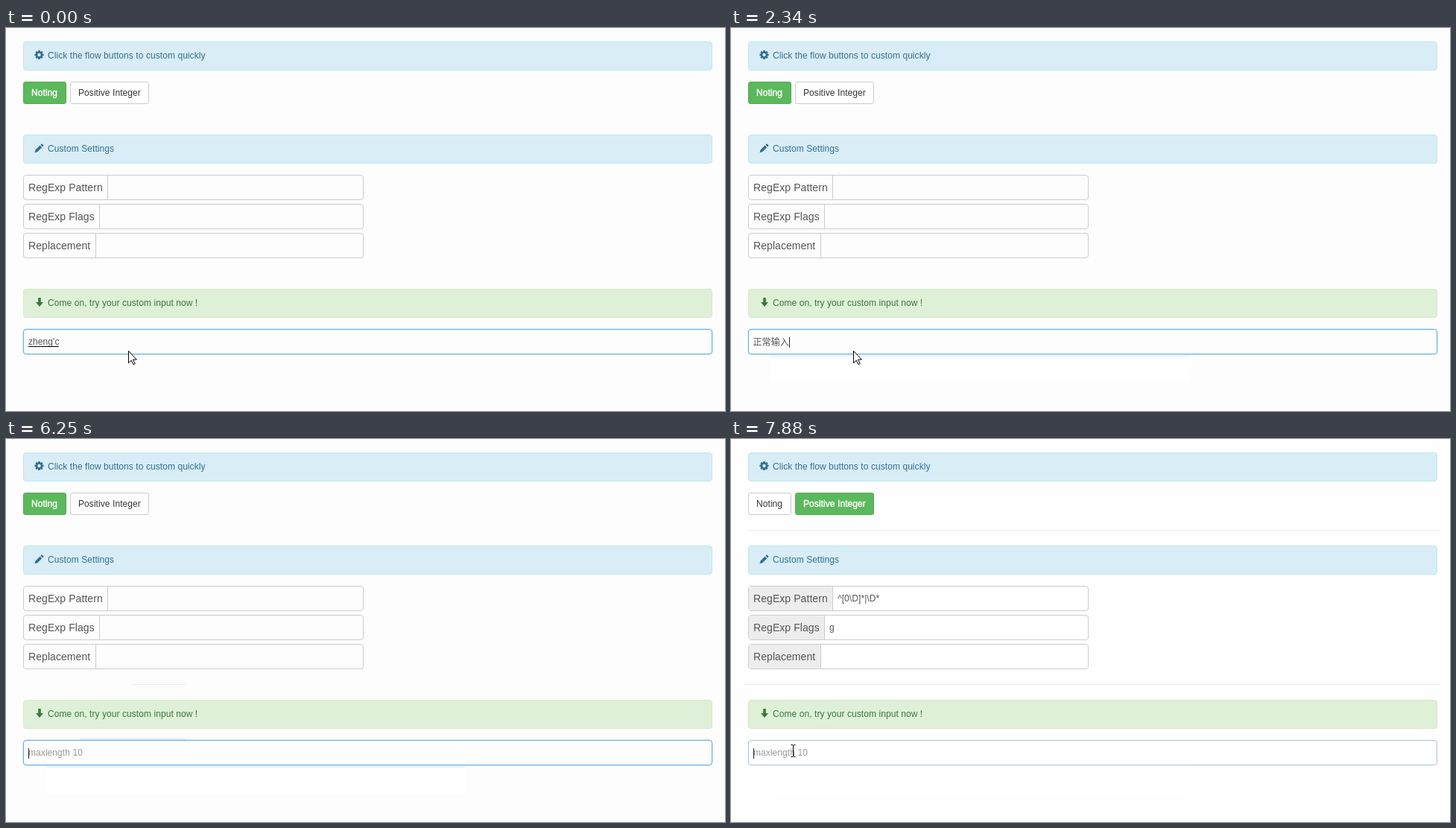
Recreate the animation shown at these times as an HTML page. Size 965 px wide and 514 px high, loop 8000 ms.

```html
<!DOCTYPE html>
<html lang="en">
<head>
<meta charset="utf-8">
<title>Custom input demo</title>
<style>
html, body { margin: 0; width: 100%; height: 100%; overflow: hidden; background: #fdfdfd; }
svg { display: block; width: 965px; height: 514px; }
text { font: 12px "Liberation Sans", "Noto Sans CJK SC", "Noto Sans CJK", sans-serif; letter-spacing: .07px; white-space: pre; }
text.lg { font-size: 14px; }
text.num { font-size: 13px; }
text.han { font: 18px "Noto Sans CJK SC", "Noto Sans CJK", sans-serif; letter-spacing: 0; }
</style>
</head>
<body>
<svg id="stage" viewBox="0 0 965 514"></svg>
<script>
const stage = document.getElementById('stage');
const LOOP = 8000;

const attrs = o => Object.entries(o).map(([k, v]) => ` ${k}="${v}"`).join('');
const esc = s => s.replace(/&/g, '&amp;').replace(/</g, '&lt;');
const fillBox = (x, y, w, h, fill) => `<rect${attrs({ x, y, width: w, height: h, fill })}/>`;
// One-pixel border drawn inside the box
const box = (x, y, w, h, fill, stroke, rx = 3.5) =>
  `<rect${attrs({ x: x + .5, y: y + .5, width: w - 1, height: h - 1, rx, fill, stroke })}/>`;
const text = (x, y, s, fill, cls = '', more = '') =>
  `<text${attrs({ x, y, fill, class: cls })} ${more}>${esc(s)}</text>`;
const path = (d, more) => `<path d="${d}" ${more}/>`;
const at = (x, y, body) => `<g transform="translate(${x} ${y})">${body}</g>`;

const icons = {
  cog() {
    let teeth = '';
    for (let a = 0; a < 360; a += 45)
      teeth += `<rect x="-1.4" y="-6" width="2.8" height="3" transform="rotate(${a})"/>`;
    return at(44.5, 36, `<g fill="#31708f">${teeth}</g><circle r="3.4" fill="none" stroke="#31708f" stroke-width="2.4"/>`);
  },
  pencil: () => at(38, 155, path('M.5 12.2 1.6 8.6 7.6 2.6 10.2 5.2 4.2 11.2ZM8.4 1.8 9.6.6Q10.2.2 10.8.7L12.1 2Q12.6 2.6 12.1 3.2L11 4.4Z', 'fill="#31708f"')),
  down: () => at(40, 362, path('M3.2 0H6.8V6H10L5 12 0 6H3.2Z', 'fill="#3c763d"'))
};

const cursors = {
  arrow: path('M.5.5V16.6L4.2 13 7 18.6 9.2 17.5 6.5 12H11.4Z', 'fill="#fff" stroke="#000"'),
  hand: path('M5.5 14V2.5A1.8 1.8 0 0 1 9.1 2.5V9Q10.7 8 11.7 9.6 13.3 8.7 14.1 10.3 16.3 9.7 16.5 11.9V16Q16.5 19 15 21V23.5H6.5V22Q4 19 1 14.5 .4 12.7 2 12.3 3.6 12.3 5.5 14ZM9.1 9V13M11.7 10V13M14.1 10.5V13',
    'fill="#fff" stroke="#000" stroke-linejoin="round"'),
  beam: path('M.5.5H3M4 .5H6.5M3.5 1V16M.5 16.5H3M4 16.5H6.5', 'fill="none" stroke="#000"')
};

function alertBar(y, icon, label, good) {
  return box(23, y, 925, 39, good ? '#dff0d8' : '#d9edf7', good ? '#d6e9c6' : '#bce8f1') +
    icons[icon]() + text(56, y + 23, label, good ? '#3c763d' : '#31708f');
}

function button(x, w, label, mode) {
  const [bg, edge, ink] = {
    plain: ['#fff', '#ccc', '#333'],
    hover: ['#e6e6e6', '#adadad', '#333'],
    press: ['#d4d4d4', '#8c8c8c', '#333'],
    green: ['#5cb85c', '#4cae4c', '#fff'],
    focus: ['#449d44', '#255625', '#fff']
  }[mode];
  const ring = mode === 'press' || mode === 'focus'
    ? `<rect${attrs({ x, y: 72, width: w, height: 30, rx: 2.5, fill: 'none', stroke: '#6486c8', 'stroke-width': 1.8 })}/>` : '';
  return box(x, 72, w, 30, bg, edge, 2.5) + ring +
    text(x + 11, 91, label, ink, '', ink === '#fff' ? 'stroke="#fff" stroke-width=".4"' : '');
}

function field(y, split, label, value, crisp, off) {
  const grey = '#ededed', base = crisp ? '#fff' : '#fdfdfd';
  return box(23, y, 457, 34, off && crisp ? grey : base, '#ccc') +
    (crisp ? fillBox(24, y + 1, split - 24, 32, grey) : '') +
    fillBox(split, y + 1, 1, 32, '#ccc') +
    text(30, y + 22, label, '#555', 'lg') + text(split + 7, y + 21, value, '#555');
}

// Candidate window: the first entry is picked, the second lies under the mouse
function candidates({ x, right, words }) {
  const end = right - 45;
  let s = fillBox(x, 432, right - x, 44, '#fff'), cx = x;
  words.split(' ').forEach((word, i) => {
    const w = 42 + 18 * word.length;
    const bg = ['#0099bf', '#a8eeff'][i];
    if (bg) s += fillBox(cx, 433, Math.min(w, end - cx), 42, bg);
    s += text(cx + 16, 461, String(i + 1), ['#fff', '#222'][i] || '#777', 'num') +
      text(cx + 27, 461, word, i ? '#000' : '#fff', 'han');
    cx += w;
  });
  s += fillBox(end, 433, 45, 42, '#fff') + box(end - 22, 435, 22, 37, '#ececec', '#bbb', 0) +
    path(`M${end - 16} 444l10 10-10 10`, 'fill="none" stroke="#666" stroke-width="1.5"') +
    fillBox(end, 433, 1, 42, '#168093') +
    at(right - 22.5, 454.5, '<circle r="7.8" fill="none" stroke="#000" stroke-width="1.2"/><circle cx="-2.8" cy="-2" r="1.2"/><circle cx="2.8" cy="-2" r="1.2"/>' +
      path('M-4.5 2Q0 7 4.5 2', 'fill="none" stroke="#000" stroke-width="1.2"'));
  return s + box(x, 432, right - x, 44, 'none', '#168093', 0);
}

function entry(s) {
  const edge = { on: '#66afe9', off: '#ccc', mid: '#a9c1d2' }[s.focus];
  let out = '';
  if (s.crisp && s.focus === 'on')
    out += `<rect x="22" y="403" width="927" height="36" rx="5" fill="none" stroke="#d3e9fa" stroke-width="3"/>`;
  else if (s.focus === 'on')
    out += `<rect x="23" y="404" width="925" height="34" rx="4" fill="none" stroke="#b5d7f3"/>`;
  out += box(23, 404, 925, 34, s.crisp ? '#fff' : '#fdfdfd', edge);
  if (!s.done && !s.typing) out += text(30, 425, 'maxlength 10', '#999');
  const x = s.done ? 54 : 30;
  out += text(29.5, 426, s.done, '#555') + text(x, s.done ? 426 : 425, s.typing, '#555');
  if (s.typing) out += fillBox(x, s.done ? 428 : 427, s.end - x, 1, '#000');
  if (s.select) {
    out += `<clipPath id="sel"><rect x="${s.select}" y="415" width="${100 - s.select}" height="14"/></clipPath>` +
      `<g clip-path="url(#sel)">${fillBox(30, 415, 70, 14, '#3399ff')}${text(29.5, 426, s.done, '#fff')}</g>`;
  }
  return out + (s.caret ? fillBox(s.caret, 415, 1, 14, '#222') : '');
}

const start = {
  done: '', typing: "zheng'c", end: 71, caret: 0, select: 0, ime: null, focus: 'on',
  mouse: ['arrow', 164, 433], left: 'green', right: 'plain',
  crisp: false, filled: false, trail: 0, trail2: 0
};
const arrow = (x, y) => ({ mouse: ['arrow', x, y] });
const beam = (x, y) => ({ mouse: ['beam', x, y] });
const popup = (x, right, words) => ({ x, right, words });

// Each step changes part of the state and holds until the next one
const steps = [
  [0, {}],
  [150, { done: '正常', typing: '', caret: 54 }],
  [300, { typing: 'sh', end: 67, caret: 67, ime: popup(63, 529, '是 上 说 时 使 事 谁'), trail: 529 }],
  [570, { typing: 'shu', end: 74, caret: 74, ime: popup(72, 616, '数 书 树 属于 输入 熟悉 数据'), trail: 616 }],
  [720, { typing: "shu'ru", end: 87, caret: 87, ime: popup(83, 566, '输入 数 树 输 书 叔 熟') }],
  [1250, { done: '正常输入', typing: '', caret: 78, ime: null }],
  [1810, { caret: 0 }],
  [2340, { caret: 78 }],
  [2870, { caret: 0 }],
  [3430, { done: '正常输入1', caret: 85 }],
  [3580, { done: '正常输入12', caret: 92 }],
  [3730, { done: '正常输入123', caret: 99 }],
  [4320, { caret: 0 }],
  [4740, { caret: 99, ...arrow(219, 379), trail2: 231 }],
  [4880, { ...arrow(230, 311), trail2: 241 }],
  [5000, arrow(196, 362)],
  [5120, beam(152, 407)],
  [5270, { caret: 0, ...beam(150, 414) }],
  [5540, { select: 56, ...beam(52, 414) }],
  [5670, { select: 30, mouse: null }],
  [6250, { done: '', select: 0, caret: 30 }],
  [6370, arrow(4, 337)],
  [6520, arrow(48, 235)],
  [6650, arrow(94, 140)],
  [6800, { crisp: true, caret: 0, right: 'hover', mouse: ['hand', 114, 95] }],
  [6930, { mouse: ['hand', 117, 92] }],
  [7050, { right: 'press' }],
  [7190, { left: 'plain', right: 'focus', filled: true, focus: 'off' }],
  [7320, arrow(127, 309)],
  [7460, arrow(101, 390)],
  [7610, beam(87, 406)],
  [7730, beam(80, 410)],
  [7880, { right: 'green', focus: 'mid', caret: 30 }]
];

function draw(s) {
  const c = s.crisp;
  let out = fillBox(0, 0, 965, 514, c ? '#fefefe' : '#fdfdfd');
  if (s.trail) {
    out += fillBox(53, 439, s.trail - 53, 37, '#fff');
    if (!c) out += fillBox(53, 439, s.trail - 53, 2, '#e4f2fc');
  }
  if (c) out += fillBox(20, 122, 932, 1, '#ececec') + fillBox(18, 329, 934, 1, '#ececec');
  else if (s.trail2) {
    out += fillBox(99, 401, s.trail2 - 99, 3, '#e4f2fc');
    if (s.trail2 > 231) out += fillBox(168, 329, 73, 1, '#eee');
  }
  out += alertBar(18, 'cog', 'Click the flow buttons to custom quickly') +
    button(23, 58, 'Noting', s.left) + button(86, 106, 'Positive Integer', s.right) +
    alertBar(143, 'pencil', 'Custom Settings') +
    field(197, 136, 'RegExp Pattern', s.filled ? '^[0\\D]*|\\D*' : '', c) +
    field(236, 125, 'RegExp Flags', s.filled ? 'g' : '', c) +
    field(275, 120, 'Replacement', '', c, !s.filled) +
    alertBar(350, 'down', 'Come on, try your custom input now !', true) +
    entry(s);
  if (s.ime) out += candidates(s.ime);
  if (s.mouse) out += at(s.mouse[1], s.mouse[2], cursors[s.mouse[0]]);
  stage.innerHTML = out;
}

let shown = -1;
function tick(now) {
  const t = now % LOOP;
  const n = steps.filter(step => step[0] <= t).length;
  if (n !== shown) {
    shown = n;
    draw(Object.assign({}, start, ...steps.slice(0, n).map(step => step[1])));
  }
  requestAnimationFrame(tick);
}
tick(0);
</script>
</body>
</html>
```
